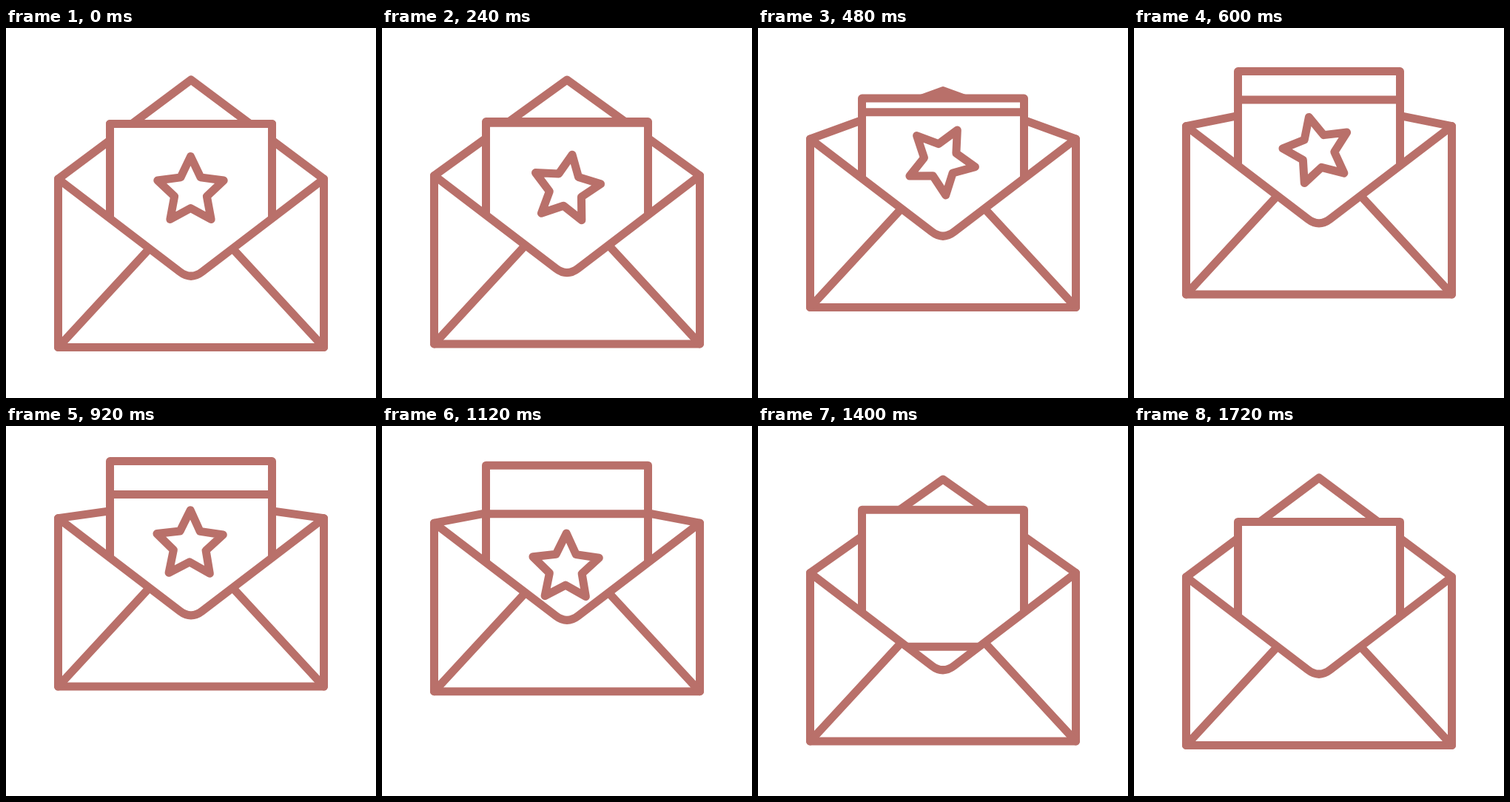
Write an HTML page that moves like this. It is 500 px wide and 500 px high and loops after 2800 ms.

```html
<!DOCTYPE html>
<html lang="en">
<head>
<meta charset="utf-8">
<title>Envelope</title>
<style>
  html, body { margin: 0; width: 100%; height: 100%; overflow: hidden; background: #fff; }
  svg { display: block; width: 100%; height: 100%; }
  .ink { fill: #fff; stroke: #b9706a; stroke-width: 11; stroke-linejoin: round; stroke-linecap: round; }
  .line { fill: none; }
</style>
</head>
<body>
<svg viewBox="0 0 500 500">
  <path id="flap" class="ink"/>
  <path id="newCard" class="ink"/>
  <path id="oldCard" class="ink"/>
  <path id="star" class="ink line"/>
  <g id="front">
    <path class="ink" d="M70.5 204 L235 329.5 Q250 341 265 329.5 L429.5 204 V431.5 H70.5 Z"/>
    <path class="ink line" d="M70.5 431.5 L192 300 M429.5 431.5 L308 300"/>
  </g>
</svg>
<script>
  const LOOP = 2800, STEP = 40;
  const UP = 40, DOWN = 880, SPAN = 840;
  const el = id => document.getElementById(id);
  const [flap, newCard, oldCard, star, front] =
    ['flap', 'newCard', 'oldCard', 'star', 'front'].map(el);

  // Same curve as cubic-bezier(x1, 0, x2, 1).
  function ease(u, x1, x2) {
    if (u <= 0) return 0;
    if (u >= 1) return 1;
    let lo = 0, hi = 1;
    for (let i = 0; i < 30; i++) {
      const s = (lo + hi) / 2, r = 1 - s;
      if (3 * r * r * s * x1 + 3 * r * s * s * x2 + s * s * s < u) lo = s;
      else hi = s;
    }
    return lo * lo * (3 - 2 * lo);
  }

  function starPath(outer, inner) {
    const pts = Array.from({ length: 10 }, (_, i) => {
      const a = i * Math.PI / 5, r = i % 2 ? inner : outer;
      return (r * Math.sin(a)).toFixed(2) + ' ' + (-r * Math.cos(a)).toFixed(2);
    });
    return 'M' + pts.join('L') + 'Z';
  }

  const cardPath = y => `M140.5 500 V${y} H359.5 V500`;

  function draw(t) {
    const up = (x1, x2) => ease((t - UP) / SPAN, x1, x2);
    const down = (x1, x2) => ease((t - DOWN) / SPAN, x1, x2);

    const back = down(0.79, -0.07);
    const lift = -79.5 * (up(0.70, 0.22) - back);
    const height = 134 - 109 * (up(0.80, 0.19) - back);
    const rise = up(0.85, 0.26);
    const sink = down(0.646, 0.402);
    const starY = 217.9 - 55.5 * up(0.73, 0.2) + 331 * sink;
    const turn = 145 * up(0.65, 0.24);
    const corner = 204 + lift;

    front.setAttribute('transform', `translate(0 ${lift})`);
    flap.setAttribute('d', `M70.5 ${corner} L250 ${corner - height} L429.5 ${corner}`);
    newCard.setAttribute('d', cardPath(129.5 - 82 * (rise - down(0.78, 0.27))));
    oldCard.setAttribute('d', cardPath(129.5 - 37.5 * rise + 278 * sink));
    star.setAttribute('transform', `translate(249.7 ${starY}) rotate(${turn}) translate(-0.2 2.6)`);

    // Card edges stop inside the envelope.
    const clip = `polygon(0 0, 500px 0, 500px ${corner + 227}px, 0 ${corner + 227}px)`;
    for (const card of [newCard, oldCard]) {
      card.style.clipPath = 'view-box ' + clip;
    }
    star.style.visibility = starY > corner + 180 ? 'hidden' : 'visible';
  }

  star.setAttribute('d', starPath(47, 23));
  const start = performance.now();
  function tick() {
    const t = (performance.now() - start) % LOOP;
    draw(Math.floor(t / STEP) * STEP);
    requestAnimationFrame(tick);
  }
  draw(0);
  requestAnimationFrame(tick);
</script>
</body>
</html>
```
